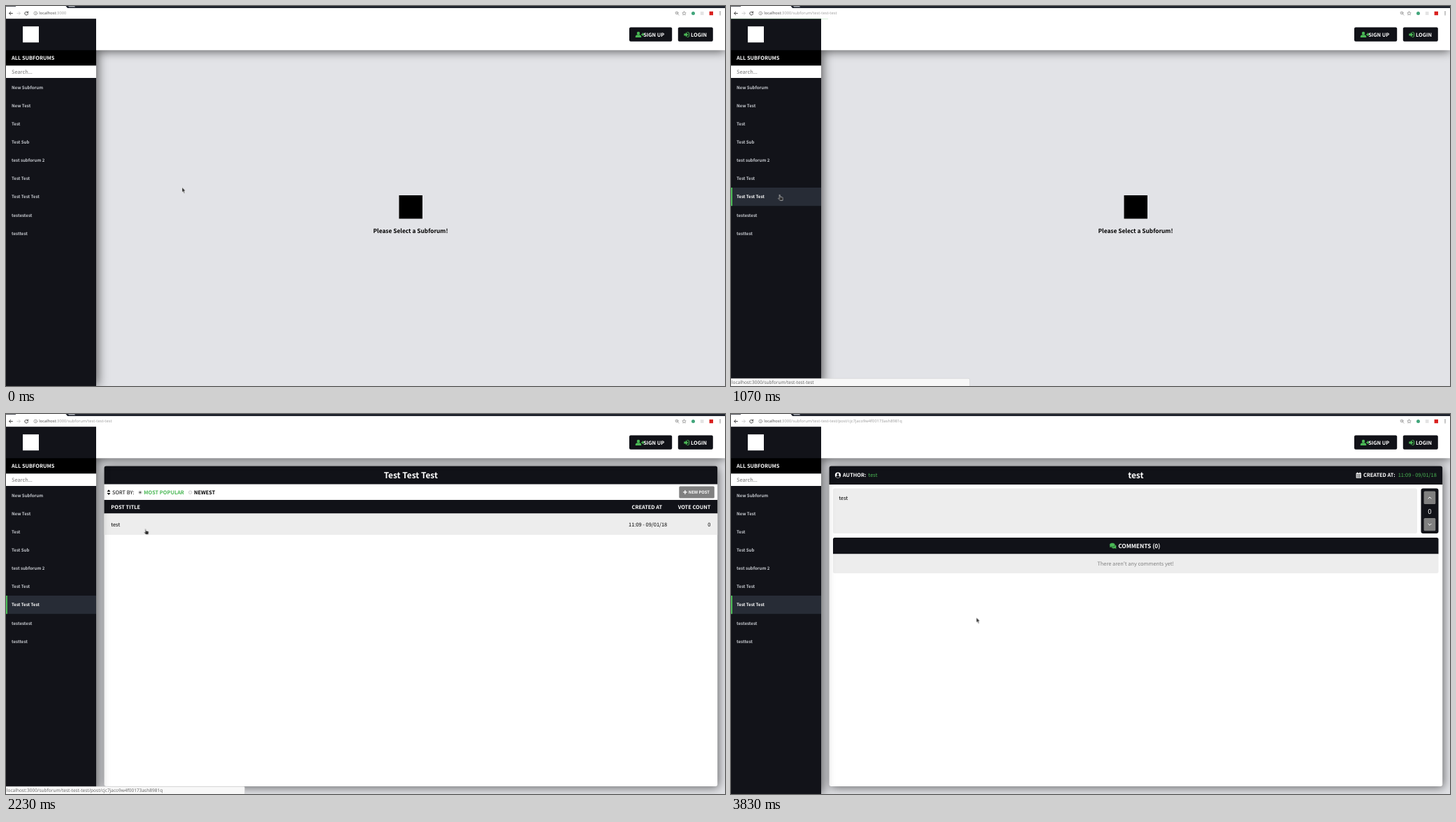
Recreate the animation shown at these times as an HTML page. Size 1029 by 544 pixels, loop 4.23 s.

```html
<!DOCTYPE html>
<html lang="en">
<head>
<meta charset="utf-8">
<title>Forum walkthrough</title>
<style>
html, body { margin: 0; width: 100%; height: 100%; overflow: hidden; background: #fff; }
svg { display: block; width: 1029px; height: 544px; }
text { font-family: "Noto Sans CJK JP", "Noto Sans CJK SC", "Noto Sans CJK", "Noto Sans", sans-serif; font-size: 7.45px; text-rendering: geometricPrecision; white-space: pre; }
.ink { fill: #111218; }
.green { fill: #4ab855; }
.white { fill: #fff; }
.pale { fill: #ededed; }
.grey { fill: #808080; }
.b { font-weight: 600; font-size: 7.38px; }
.item { font-weight: 600; font-size: 6.15px; fill: #c5c8ce; }
.title { font-weight: 600; font-size: 11.9px; }
.mid { text-anchor: middle; }
.end { text-anchor: end; }
.url text, .status text { font-family: "Noto Sans", "Open Sans", sans-serif; }
.url text { font-size: 5.78px; fill: #a2a2a2; }
.url tspan { fill: #555; }
.status text { font-size: 6.52px; fill: #6a6a6a; }
.line { fill: none; stroke-width: 1; stroke-linecap: round; stroke-linejoin: round; }
.sidebar { filter: drop-shadow(2px 0 8px rgba(0,0,0,.65)); }
.header { filter: drop-shadow(0 2px 7px rgba(0,0,0,.6)); }
.card { filter: drop-shadow(2px 2px 7px rgba(0,0,0,.55)); }

/* Hard switches: pages, addresses, pointer shapes */
.cut { animation: 4.23s step-end infinite; }
#home { animation-name: home; }
#panel { animation-name: panel; }
#list { animation-name: list; }
#load { animation-name: load; }
#post { animation-name: post; }
#url0 { animation-name: url0; }
#url1 { animation-name: url1; }
#url2 { animation-name: url2; }
#link1 { animation-name: link1; }
#link2 { animation-name: link2; }
#arrow { animation-name: arrow; }
#hand { animation-name: hand; }
@keyframes home { 0% { opacity: 1 } 32.39%, 100% { opacity: 0 } }
@keyframes panel { 0% { opacity: 0 } 32.39%, 100% { opacity: 1 } }
@keyframes list { 0% { opacity: 0 } 32.39% { opacity: 1 } 65.48%, 100% { opacity: 0 } }
@keyframes load { 0% { opacity: 0 } 65.48% { opacity: 1 } 70.9%, 100% { opacity: 0 } }
@keyframes post { 0% { opacity: 0 } 70.9%, 100% { opacity: 1 } }
@keyframes url0 { 0% { opacity: 1 } 20.57%, 100% { opacity: 0 } }
@keyframes url1 { 0% { opacity: 0 } 20.57% { opacity: 1 } 65.48%, 100% { opacity: 0 } }
@keyframes url2 { 0% { opacity: 0 } 65.48%, 100% { opacity: 1 } }
@keyframes link1 { 0% { opacity: 1 } 44.92%, 100% { opacity: 0 } }
@keyframes link2 { 0% { opacity: 0 } 44.92%, 100% { opacity: 1 } }
@keyframes arrow { 0% { opacity: 1 } 9.46% { opacity: 0 } 38.5% { opacity: 1 } 44.92% { opacity: 0 } 66%, 100% { opacity: 1 } }
@keyframes hand { 0% { opacity: 0 } 9.46% { opacity: 1 } 38.5% { opacity: 0 } 44.92% { opacity: 1 } 66%, 100% { opacity: 0 } }

/* Smooth motion */
#active { animation: active 4.23s linear infinite; }
#status { animation: status 4.23s linear infinite; }
#rowHover { animation: rowHover 4.23s linear infinite; }
#bar { animation: bar 4.23s linear infinite; }
#pointer { animation: pointer 4.23s ease-in-out infinite; }
@keyframes active { 0%, 9.46% { opacity: 0 } 13.5%, 100% { opacity: 1 } }
@keyframes status { 0%, 15.6% { opacity: 0 } 18.5%, 78.01% { opacity: 1 } 83%, 100% { opacity: 0 } }
@keyframes rowHover { 0%, 44.7% { opacity: 0 } 49%, 100% { opacity: 1 } }
@keyframes bar {
  0%, 23.7% { opacity: 0; transform: scaleX(0) }
  29.08%, 32.15% { opacity: .7; transform: scaleX(.45) }
  33.5% { opacity: 1; transform: scaleX(1) }
  40.2% { opacity: 0; transform: scaleX(1) }
  40.21%, 65.48% { opacity: 0; transform: scaleX(0) }
  66.9% { opacity: .08; transform: scaleX(.5) }
  70.9%, 74% { opacity: 1; transform: scaleX(1) }
  82%, 100% { opacity: 0; transform: scaleX(1) }
}
@keyframes pointer {
  0%, 3.07% { transform: translate(252px, 259.6px) }
  14.18%, 32.39% { transform: translate(69.6px, 270px); animation-timing-function: ease-in }
  37.83% { transform: translate(94.8px, 249.4px); animation-timing-function: linear }
  44.21% { transform: translate(170px, 178px); animation-timing-function: ease-out }
  52.72%, 69.5% { transform: translate(199.5px, 164px); animation-timing-function: ease-in }
  71.63% { transform: translate(201.6px, 165.6px); animation-timing-function: ease-in-out }
  84.4%, 100% { transform: translate(351.2px, 291.4px) }
}
#load rect { transform-box: fill-box; transform-origin: center; animation: pulse 4.23s linear infinite; }
#load .near { animation-delay: .1s; }
#load .far { animation-delay: .2s; }
@keyframes pulse { 0%, 65.48% { transform: scaleY(1) } 70.5% { transform: scaleY(.4) } 80%, 100% { transform: scaleY(1) } }
</style>
</head>
<body>
<svg viewBox="0 0 1029 544">
  <rect width="1029" height="544" fill="#e2e3e7"/>

  <g id="home" class="cut">
    <rect x="562.5" y="271" width="33.5" height="33.5"/>
    <text class="b mid" x="579" y="325" style="font-size:8.35px">Please Select a Subforum!</text>
  </g>

  <g id="panel" class="cut">
    <rect class="card white" x="140.5" y="74.5" width="877.7" height="458.5" rx="3"/>
  </g>

  <g id="list" class="cut">
    <path class="ink" d="M140.5 100.5v-23q0-3 3-3h871.7q3 0 3 3v23zM140.5 123h877.7v19.5H140.5z"/>
    <text class="title white mid" x="579.3" y="92.2">Test Test Test</text>
    <path d="M144.6 111.3l2.4-3 2.4 3zM144.6 112.9l2.4 3 2.4-3z"/>
    <text x="152" y="114.9">SORT BY:</text>
    <g fill="#f4f4f4" stroke="#b0b0b0" stroke-width=".6"><circle cx="192" cy="112.2" r="2.3"/><circle cx="263.7" cy="112.2" r="2.3"/></g>
    <circle cx="192" cy="112.2" r="1.3" fill="#555"/>
    <text class="b green" x="197.2" y="114.9">MOST POPULAR</text>
    <text class="b" x="269" y="114.9">NEWEST</text>
    <rect class="grey" x="963.3" y="103.5" width="50.5" height="17" rx="1.5"/>
    <path class="line" stroke="#fff" d="M969.6 111.9h4.6M971.9 109.6v4.6" style="stroke-width:1.4"/>
    <text class="b white" x="976.8" y="114.1" style="font-size:5.85px">NEW POST</text>
    <g class="b white">
      <text class="b" x="150.3" y="135.8">POST TITLE</text>
      <text class="b" x="895.6" y="135.8">CREATED AT</text>
      <text class="b end" x="1008.3" y="135.8">VOTE COUNT</text>
    </g>
    <rect id="rowHover" class="pale" x="140.5" y="142.5" width="877.7" height="30.5"/>
    <text x="150.3" y="160.8">test</text>
    <text class="end" x="946.2" y="160.8">11:09 - 09/01/18</text>
    <text class="end" x="1008.3" y="160.8">0</text>
  </g>

  <g id="load" class="cut">
    <rect class="far" x="559.8" y="285.3" width="4.4" height="35" rx="2.1"/>
    <rect class="near" x="568.4" y="285.3" width="4.4" height="35" rx="2.1"/>
    <rect x="577" y="285.3" width="4.4" height="35" rx="2.1"/>
    <rect class="near" x="585.7" y="285.3" width="4.4" height="35" rx="2.1"/>
    <rect class="far" x="594.4" y="285.3" width="4.4" height="35" rx="2.1"/>
  </g>

  <g id="post" class="cut">
    <path class="ink" d="M140.5 101v-23.5q0-3 3-3h871.7q3 0 3 3V101z"/>
    <circle class="white" cx="153" cy="87.6" r="4.1"/>
    <circle class="ink" cx="153" cy="86.4" r="1.6"/>
    <path class="ink" d="M150.2 90.2q.4-1.8 1.5-1.9h2.6q1.1.1 1.5 1.9-2.8 2-5.6 0z"/>
    <text class="b white" x="160" y="90.4">AUTHOR:</text>
    <text class="green" x="196.5" y="90.4">test</text>
    <text class="title white mid" x="579.3" y="92.2">test</text>
    <rect class="white" x="894.6" y="84.4" width="7.4" height="7.4" rx=".7"/>
    <path class="line" stroke="#fff" d="M896.4 83.9v1M900.2 83.9v1"/>
    <path class="line" stroke="#111218" stroke-width=".5" d="M895.2 86.5h6.2M895.2 88.2h6.2M895.2 90h6.2M897.2 86.5v4.7M899.4 86.5v4.7" style="stroke-width:.45"/>
    <text class="b white" x="904.9" y="90.4">CREATED AT:</text>
    <text class="green end" x="1009.8" y="90.4">11:09 - 09/01/18</text>

    <rect class="pale" x="146" y="106.5" width="836" height="64.5" rx="2.5"/>
    <text x="154.4" y="122.9">test</text>
    <rect class="ink" x="987.5" y="106.5" width="25" height="64.5" rx="3"/>
    <rect class="grey" x="991.6" y="110.6" width="16.7" height="18.3" rx="1.5"/>
    <rect class="grey" x="991.6" y="149" width="16.7" height="18.2" rx="1.5"/>
    <path class="line" stroke="#fff" d="M997.9 121l2.1-2.1 2.1 2.1M997.9 157.2l2.1 2.1 2.1-2.1"/>
    <text class="white mid" x="1000" y="142.7" style="font-size:9.7px">0</text>

    <path class="ink" d="M146 200.5v-21q0-2.5 2.5-2.5H1010q2.5 0 2.5 2.5v21z"/>
    <g class="green">
      <ellipse cx="547.8" cy="189.7" rx="3.5" ry="2.7"/><path d="M549 191.5l2.4 1.7-.5-2.6z"/>
      <ellipse cx="545.7" cy="187.4" rx="4" ry="3" stroke="#111218" stroke-width=".5"/><path d="M542.5 188.7l-.4 2.2 2.6-.8z"/>
    </g>
    <text class="b white" x="554.2" y="191.7" style="font-size:8.3px">COMMENTS (0)</text>
    <path class="pale" d="M146 200.5h866.5v25q0 2.5-2.5 2.5H148.5q-2.5 0-2.5-2.5z"/>
    <text class="mid grey" x="579.2" y="217">There aren't any comments yet!</text>
  </g>

  <rect class="sidebar" y="18" width="129" height="526" fill="#121319"/>
  <rect class="header white" x="129" y="18" width="900" height="45.3"/>
  <rect y="18" width="129" height="45.3" fill="#121319"/>
  <rect class="white" x="24" y="29.2" width="23" height="23"/>
  <rect y="63.3" width="129" height="22"/>
  <text class="b white" x="8" y="77">ALL SUBFORUMS</text>
  <rect class="white" y="85.3" width="129" height="17.7"/>
  <text x="8" y="96.8" fill="#777">Search...</text>
  <text class="item" x="8" y="118.5">New Subforum</text>
  <text class="item" x="8" y="144.6">New Test</text>
  <text class="item" x="8" y="170.8">Test</text>
  <text class="item" x="8" y="196.9">Test Sub</text>
  <text class="item" x="8" y="223.1">test subforum 2</text>
  <text class="item" x="8" y="249.2">Test Test</text>
  <text class="item" x="8" y="275.4">Test Test Test</text>
  <text class="item" x="8" y="301.6">testestest</text>
  <text class="item" x="8" y="327.7">testtest</text>
  <g id="active">
    <rect y="260" width="129" height="26.2" fill="#272c36"/>
    <rect class="green" y="260" width="2" height="26.2"/>
    <text class="item" x="8" y="275.4" style="fill:#fff">Test Test Test</text>
  </g>

  <rect class="ink" x="892" y="30.6" width="61.2" height="20.2" rx="2"/>
  <rect class="ink" x="961.8" y="30.6" width="50" height="20.2" rx="2"/>
  <g class="green">
    <circle cx="905" cy="39" r="2.2"/>
    <path d="M900.8 45v-1.2q.3-2.4 2.3-2.6h3.8q2 .2 2.3 2.6V45z"/>
    <path d="M910.8 38.5h1.4V40h1.6v1.4h-1.6V43h-1.4v-1.6h-1.6V40h1.6z"/>
    <path d="M970.3 39.6h2.6v-2l3.4 3.4-3.4 3.4v-2h-2.6z"/>
  </g>
  <path class="line" stroke="#4ab855" d="M975 37.7h1.4q1.1 0 1.1 1.1v4.4q0 1.1-1.1 1.1H975"/>
  <text class="b white" x="912.2" y="43.8">SIGN UP</text>
  <text class="b white" x="980" y="43.8">LOGIN</text>

  <rect class="white" width="1029" height="18.2"/>
  <path fill="#20242e" d="M0 0h1029v3H88L85.5 0H14v.8H0z"/>
  <path fill="#a9adb5" d="M89 0h9l1.2 1.6h-9z"/>
  <g class="line" stroke="#4c4c4c">
    <path d="M9.4 10.5H4.8M6.8 8.3l-2.2 2.2 2.2 2.2"/>
    <path stroke="#d2d2d2" d="M15.8 10.5h4.6M18.4 8.3l2.2 2.2-2.2 2.2"/>
    <path d="M31.2 9.2a2.4 2.4 0 1 0 .4 2M31.6 8v1.7h-1.7"/>
  </g>
  <g class="line" stroke="#777" style="stroke-width:.6">
    <circle cx="42.3" cy="10.4" r="2.4"/><path d="M42.3 10.2v1.4M42.3 9v.1"/>
    <circle cx="960" cy="9.9" r="1.9"/><path d="M961.4 11.4l1.7 1.7M959.2 9.9h1.6"/>
    <path d="M970.5 7.8l.8 1.8 1.9.2-1.4 1.3.4 1.9-1.7-1-1.7 1 .4-1.9-1.4-1.3 1.9-.2z"/>
  </g>
  <circle cx="983.5" cy="10.4" r="2.5" fill="#41a57b"/>
  <rect x="993.8" y="8.1" width="4.8" height="4.8" fill="#e4e4e4"/>
  <rect x="1006.6" y="7.8" width="5.4" height="5.4" fill="#d9211f"/>
  <g fill="#555"><circle cx="1022" cy="8.4" r=".7"/><circle cx="1022" cy="10.5" r=".7"/><circle cx="1022" cy="12.6" r=".7"/></g>
  <g class="url">
    <text id="url0" class="cut" x="47.2" y="12.4"><tspan>localhost</tspan>:3000</text>
    <text id="url1" class="cut" x="47.2" y="12.4"><tspan>localhost</tspan>:3000/subforum/test-test-test</text>
    <text id="url2" class="cut" x="47.2" y="12.4"><tspan>localhost</tspan>:3000/subforum/test-test-test/post/cjc7jaco9w4f00173ash8981q</text>
  </g>
  <rect id="bar" class="green" y="18" width="1029" height="1.1"/>

  <g id="status" class="status">
    <path d="M-1 545V533.3H340q1.7 0 1.7 1.7v10z" fill="#f8f8f8" stroke="#c8c8c8" stroke-width=".5"/>
    <text id="link1" class="cut" x=".8" y="541.2">localhost:3000/subforum/test-test-test</text>
    <text id="link2" class="cut" x=".8" y="541.2">localhost:3000/subforum/test-test-test/post/cjc7jaco9w4f00173ash8981q</text>
  </g>

  <g id="pointer" fill="#2d2d2d" stroke="#fff" stroke-width=".5" stroke-linejoin="round">
    <path id="arrow" class="cut" d="M0 0v7.1l1.6-1.4 1.2 2.7 1.2-.5-1.2-2.7 2.1-.1z"/>
    <path id="hand" class="cut" d="M-.5.3q.8-.5 1.1.5l.4 2.4 2.7.6q1.2.3 1 1.6l-.5 3.1H.8L-1.9 5.6q.2-1 1.4-.3l.4.2z"/>
  </g>
</svg>
</body>
</html>
```
